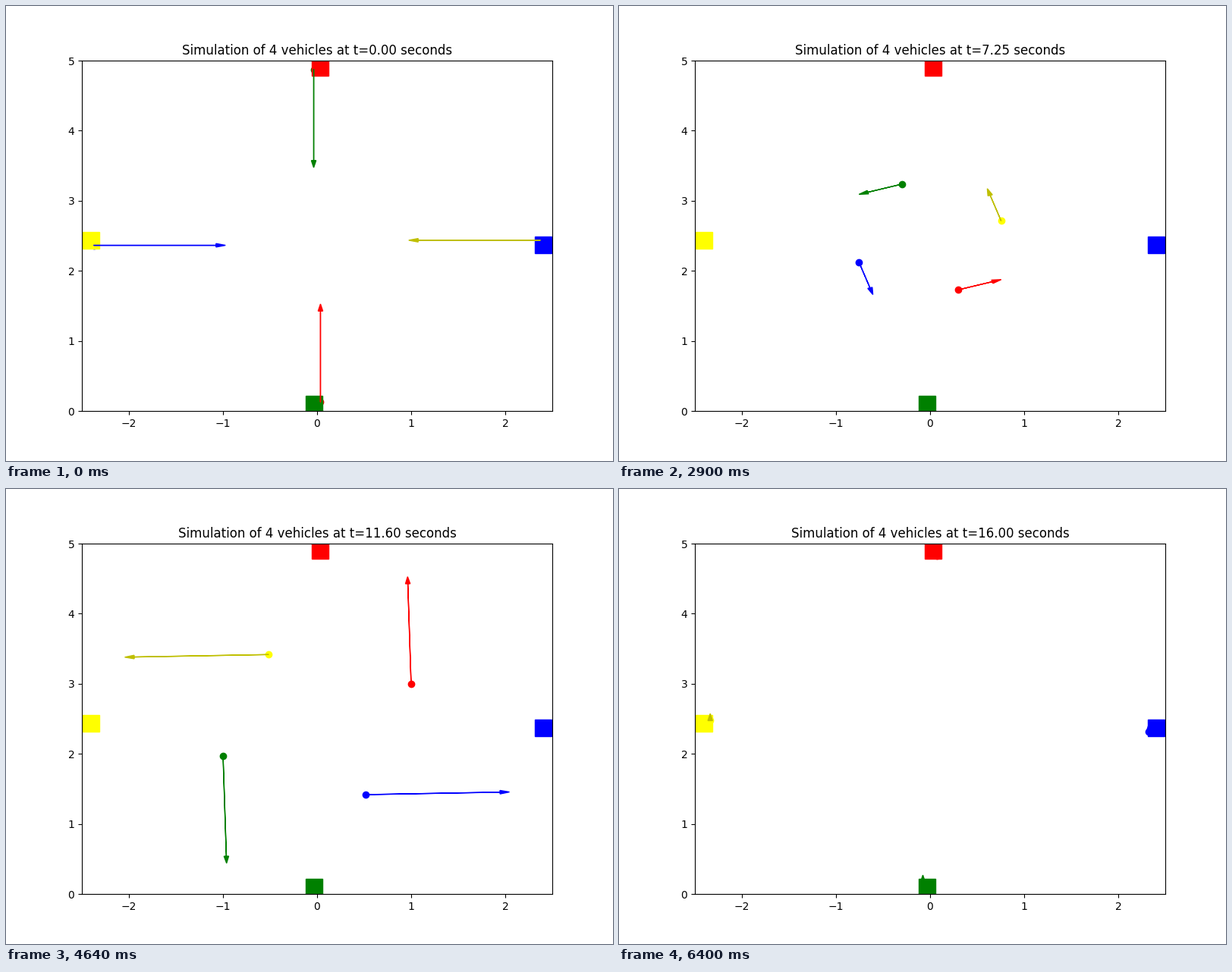
A matplotlib script for the animation above (6.42 s loop, 800x600 px).

```python
import numpy as np
import matplotlib.pyplot as plt
from matplotlib.animation import FuncAnimation

FRAMES, DT, GAIN = 321, 0.05, 0.4   # GAIN: distance per second for one unit of arrow
STEP = GAIN * DT
CRUISE = 250                        # from this step on every vehicle heads straight home
STOP = 0.1                          # parking distance to the goal

time = np.arange(FRAMES) * DT

# All vehicles share one motion, turned by quarter turns about the crossing.
# Complex plane: 1 is forward, -1j is to the right.
START, GOAL = -2.374 - 0.036j, 2.4 - 0.035j

# Brake in front of the crossing, pick up speed while circling it.
speed = np.interp(time, [1.87, 2.4, 3.3, 3.9], [1.3, 0.725, 0.575, 0.13])
speed += 1.3 * np.clip((time - 4.6) / 6.6, 0, 1) ** 1.8
speed -= 0.27 * np.clip(time - 12, 0, 0.5)

# Swerve to the right, then bend back to the left.
swerve = np.interp(time, [1.87, 3.3, 4.6, 6, 7.7, 10.7, 11.7, 12.5],
                   [0, 3, 46.5, 73, 72, 13, -3, -30])
velocity = speed * np.exp(-1j * np.radians(swerve))
path = START + STEP * np.append(0, np.cumsum((velocity[1:] + velocity[:-1]) / 2))


def drive(turn, height):
    """Positions and arrows of one vehicle, and its goal."""
    goal = height * 1j + turn * GOAL
    # The two pairs push each other slightly towards the middle.
    shift = 0.017 * np.sign(2.45 - height) * np.minimum(time / 2.4, 1)
    pos = (height + shift) * 1j + turn * path
    arrow = turn * velocity

    # Straight run to the goal, then an abrupt stop.
    here = pos[CRUISE]
    left = abs(goal - here)
    way = (goal - here) / left
    for i in range(CRUISE, FRAMES):
        pace = min(1.5, speed[CRUISE] + 0.021 * (i - CRUISE)) if left >= STOP else 0
        if i > CRUISE:
            here += way * pace * STEP
            left -= pace * STEP
        pos[i] = here
        arrow[i] = way * pace if left >= STOP else 0
    return pos, arrow, goal


vehicles = [("red", "r", 1j, 2.5), ("green", "g", -1j, 2.5),
            ("blue", "b", 1, 2.4), ("yellow", "y", -1, 2.4)]
tracks = [drive(turn, height) for *_, turn, height in vehicles]

fig, ax = plt.subplots(figsize=(8, 6), dpi=100)
ax.set_xlim(-2.5, 2.5)
ax.set_ylim(0, 5)
title = ax.set_title("")

dots = [ax.plot([], [], "o", color=c, ms=6, zorder=1)[0] for c, *_ in vehicles]
for (color, *_), (*_, goal) in zip(vehicles, tracks):
    ax.plot(goal.real, goal.imag, "s", color=color, ms=16, zorder=1)
arrows = [ax.arrow(0, 0, 1, 1, head_width=0.05, head_length=0.1, fc=c, ec=c)
          for _, c, *_ in vehicles]


def update(i):
    title.set_text(f"Simulation of 4 vehicles at t={time[i]:.2f} seconds")
    for dot, arrow, (pos, vec, _) in zip(dots, arrows, tracks):
        p, v = pos[i], vec[i]
        dot.set_data([p.real], [p.imag])
        arrow.set_data(x=p.real, y=p.imag, dx=v.real, dy=v.imag)
    return [title, *dots, *arrows]


anim = FuncAnimation(fig, update, frames=FRAMES, interval=20, repeat=True,
                     repeat_delay=0, blit=False)
plt.show()
```
